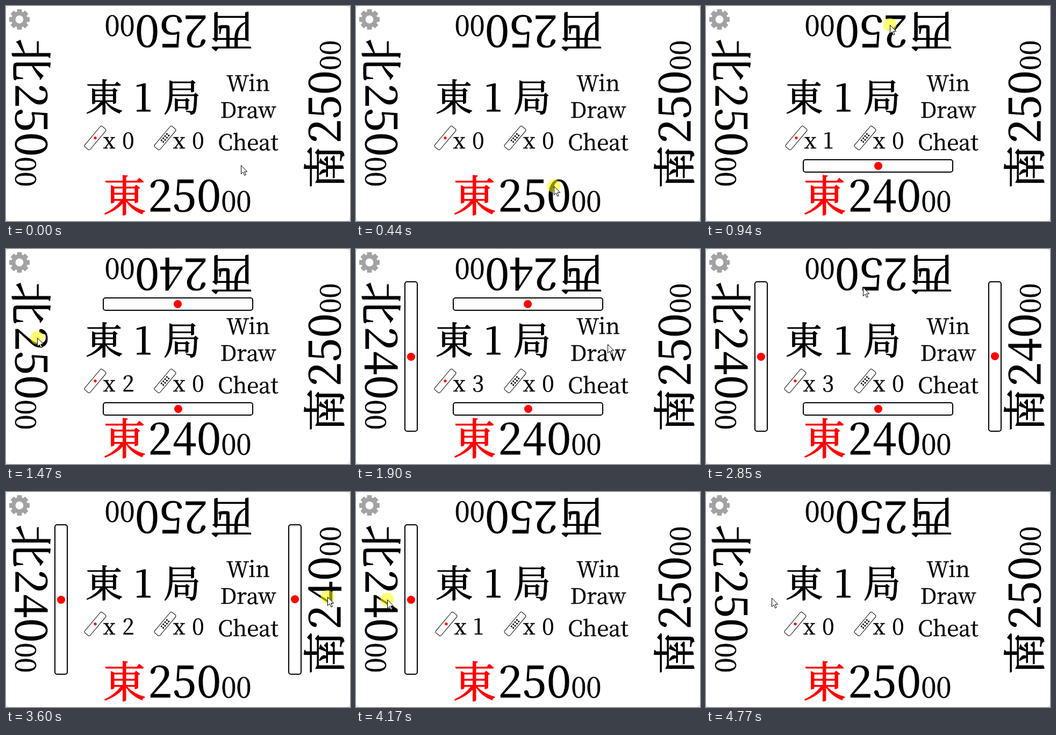
Animation, 640 px wide and 400 px high, one loop 4.84 s. Source, as an HTML page:

```html
<!DOCTYPE html>
<html lang="ja">
<head>
<meta charset="utf-8">
<title>Score board</title>
<style>
  html, body { margin: 0; width: 100%; height: 100%; overflow: hidden; background: #eee; }
  svg { display: block; width: 640px; height: 400px; }
  /* the thin stroke gives a medium weight */
  text {
    font-family: "Noto Serif CJK JP", "Noto Serif CJK SC", "Noto Serif", "Noto Sans CJK JP", "Noto Sans CJK", serif;
    text-anchor: middle;
    fill: currentColor;
    stroke: currentColor;
    stroke-width: .015em;
  }
  .big { font-size: 80px; }
  .small { font-size: 50px; }
  .round { font-size: 70px; }
  .label { font-size: 40px; }
  .line { fill: #fff; stroke: #000; }
</style>
</head>
<body>
<svg id="stage" viewBox="0 0 640 400">
  <rect width="640" height="400" rx="9" fill="#fff"/>
  <g id="gear" transform="translate(25 25)" fill="#a2a2a2">
    <circle r="11.2" fill="none" stroke="#a2a2a2" stroke-width="7.6"/>
  </g>
  <text class="round" x="182.5 255 327.5" y="195.5">東1局</text>
  <text class="label" x="450.5" y="158">Win</text>
  <text class="label" x="450.5" y="208">Draw</text>
  <text class="label" x="450.5" y="268">Cheat</text>
  <g id="riichi">
    <g transform="translate(166 245.5) rotate(-50)">
      <rect class="line" x="-25" y="-6.5" width="50" height="13" rx="3"/>
      <circle r="2.6" fill="#f00"/>
    </g>
    <text class="label" x="192" y="264.5">x</text>
  </g>
  <text id="count" class="label" x="227.5" y="264.5">0</text>
  <g id="honba" transform="translate(296 245.5) rotate(-50)">
    <rect class="line" x="-25" y="-6.5" width="50" height="13" rx="3"/>
  </g>
  <text class="label" x="322 357.5" y="264.5">x0</text>
  <g id="seats"></g>
  <circle id="glow" r="12.5" fill="#ff0" opacity=".55"/>
  <path id="cursor" class="line" d="M.5 .5V16.5L4.2 13L6.8 19L9.3 18L6.7 12.1H11.7Z"/>
</svg>
<script>
const LOOP = 4840, PRESS = 70, GLOW = 110;
const $ = id => document.getElementById(id);

function add(parent, tag, attrs, text = '') {
  const el = document.createElementNS('http://www.w3.org/2000/svg', tag);
  for (const key in attrs) el.setAttribute(key, attrs[key]);
  el.textContent = text;
  return parent.appendChild(el);
}

// on / off: moments when the mouse button goes down on a seat
const seats = [
  { wind: '東', angle: 0,   shift: 0,   color: '#f00', on: 410,  off: 3110 },
  { wind: '西', angle: 180, shift: 0,   color: '#000', on: 940,  off: 2710 },
  { wind: '北', angle: 90,  shift: 120, color: '#000', on: 1470, off: 4170 },
  { wind: '南', angle: -90, shift: 120, color: '#000', on: 2250, off: 3600 }
];
const clicks = seats.flatMap(s => [s.on, s.off]);

// time, x, y
const path = [
  [0, 437, 296], [70, 437, 296], [240, 368, 335], [480, 368, 335],
  [830, 342, 35], [1010, 342, 35], [1400, 58, 165], [1540, 58, 165],
  [2060, 586, 180], [2360, 586, 180], [2680, 292, 71], [2870, 292, 71],
  [3050, 300, 335], [3200, 300, 335], [3530, 598, 195], [3690, 598, 195],
  [4100, 58, 200], [4270, 58, 200], [4630, 133, 198], [4670, 133, 198],
  [4770, 122, 197], [LOOP, 122, 197]
];

for (const s of seats) {
  const g = add($('seats'), 'g', {
    transform: `translate(320 200) rotate(${s.angle}) translate(0 ${s.shift})`
  });
  add(g, 'text', { class: 'big', x: -99.5, y: 181.8, color: s.color }, s.wind);
  s.score = add(g, 'text', { class: 'big', x: '-33.5 12 57.5', y: 181.8 }, '250');
  add(g, 'text', { class: 'small', x: '94.5 122.5', y: 181.8 }, '00');
  s.stick = add(g, 'g', {});
  add(s.stick, 'rect', { class: 'line', x: -139, y: 86, width: 278, height: 23, rx: 4, 'stroke-width': 2 });
  add(s.stick, 'circle', { cx: 0.5, cy: 97.5, r: 7.6, fill: '#f00' });
}

for (let i = 0; i < 8; i++) {
  add($('gear'), 'rect', { x: -4.5, y: -19, width: 9, height: 7, rx: 1, transform: `rotate(${i * 45})` });
  add($('honba'), 'circle', { cx: (i % 4 - 1.5) * 5.2, cy: i < 4 ? -2.2 : 2.2, r: 1.6 });
}

function cursorAt(t) {
  const i = path.findIndex(p => p[0] > t);
  const [t0, x0, y0] = path[i - 1], [t1, x1, y1] = path[i];
  const u = (t - t0) / (t1 - t0), e = u * u * (3 - 2 * u);
  return [Math.round(x0 + (x1 - x0) * e), Math.round(y0 + (y1 - y0) * e)];
}

function setText(el, text) {
  if (el.textContent !== text) el.textContent = text;
}

function draw(t) {
  let count = 0;
  for (const s of seats) {
    const active = t >= s.on + PRESS && t < s.off + PRESS;
    count += active;
    setText(s.score, active ? '240' : '250');
    s.stick.style.display = active ? '' : 'none';
  }
  setText($('count'), String(count));
  // the digit 1 is narrower, so the centred row closes up
  $('riichi').setAttribute('transform', `translate(${count === 1 ? 2 : 0} 0)`);

  const place = `translate(${cursorAt(t).join(' ')})`;
  $('cursor').setAttribute('transform', place);
  $('glow').setAttribute('transform', place);
  $('glow').style.display = clicks.some(c => t >= c && t < c + GLOW) ? '' : 'none';
}

const start = performance.now();
function tick() {
  draw((performance.now() - start) % LOOP);
  requestAnimationFrame(tick);
}
tick();
</script>
</body>
</html>
```
